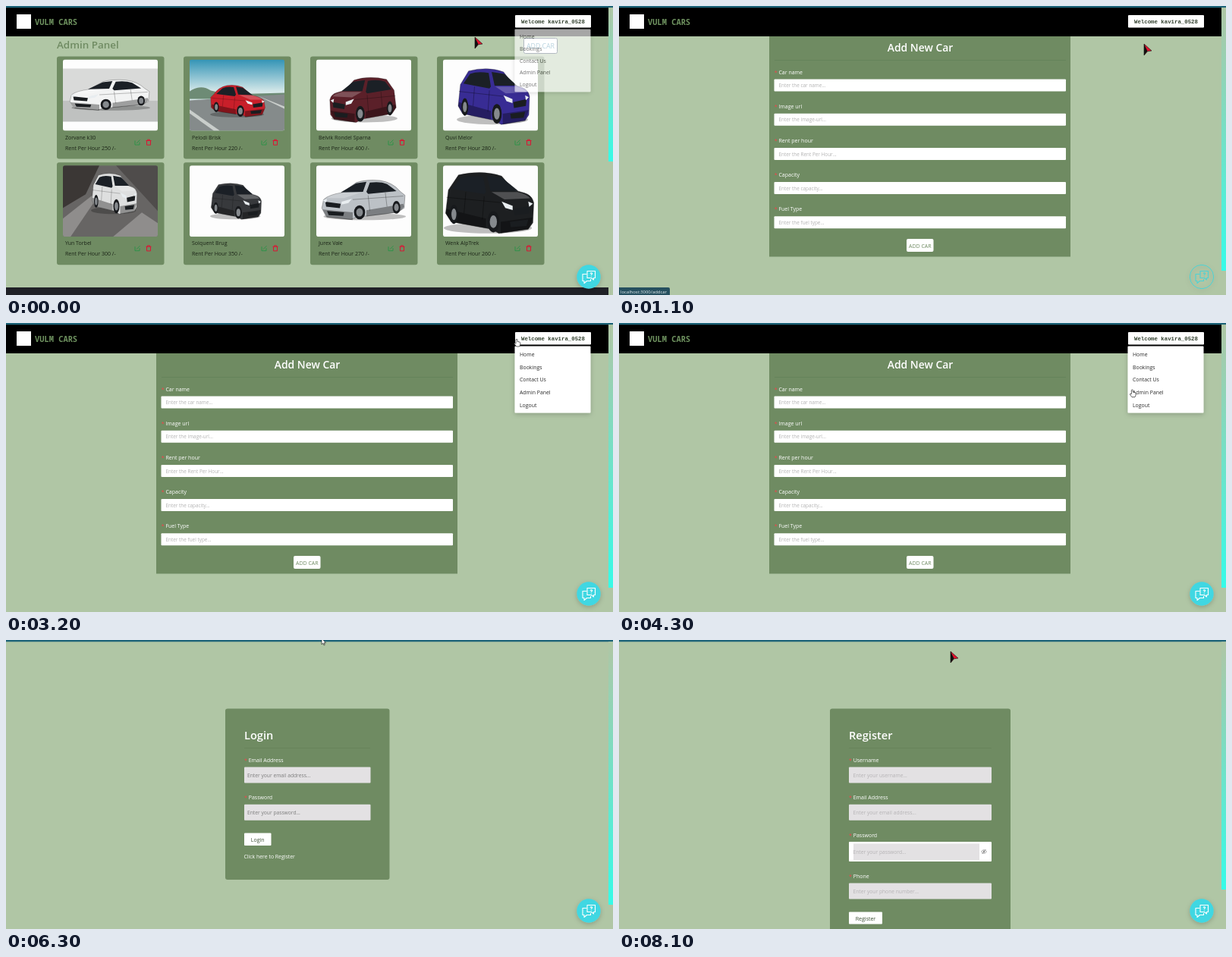
Animation, 800 px wide and 381 px high, one loop 8.2 s. Source, as an HTML page:

```html
<!DOCTYPE html>
<html lang="en">
<head>
<meta charset="utf-8">
<title>Car rental admin</title>
<style>
html, body { margin: 0; width: 100%; height: 100%; overflow: hidden; background: #b0c6a5; }
svg { display: block; width: 100vw; height: 100vh; }
text { font-family: "Open Sans", "Noto Sans", sans-serif; white-space: pre; }
</style>
</head>
<body>
<svg id="stage" viewBox="0 0 800 381" preserveAspectRatio="none"></svg>
<script>
const GREEN = '#6f8b62', BG = '#b0c6a5';
const rect = (x, y, w, h, fill, r = 0, more = '') =>
  `<rect x="${x}" y="${y}" width="${w}" height="${h}" rx="${r}" fill="${fill}" ${more}/>`;
const text = (x, y, s, size, fill, more = '') =>
  `<text x="${x}" y="${y}" font-size="${size}" fill="${fill}" ${more}>${s}</text>`;
const path = (d, fill, more = '') => `<path d="${d}" fill="${fill}" ${more}/>`;
const line = (d, color, w = 1) => path(d, 'none', `stroke="${color}" stroke-width="${w}"`);
const group = (id, body, more = '') => `<g id="${id}" ${more}>${body}</g>`;
const middle = 'text-anchor="middle"';

// Body, windows and bonnet of a car in a 100 x 60 box, nose to the left
const shapes = {
  low: ['M2 42 L4 30 Q10 23 26 20 L42 6 Q54 1 70 3 Q85 6 93 18 L99 24 L98 42 L90 48 L42 55 L36 58 L7 54Z',
        'M24 20 L42 7 L54 5 L50 19Z M54 19 L58 6 Q70 4 78 8 L89 18 L56 22Z',
        'M7 28 Q12 23 26 20 L48 20 L28 28Z'],
  tall: ['M3 49 L2 30 Q4 23 12 21 L24 18 L37 5 Q58 -1 84 4 L95 18 L98 40 L92 48 L48 55 L40 59 L8 55Z',
         'M19 19 L36 7 L53 5 L49 19Z M54 20 L57 6 Q72 4 82 7 L91 17 L56 22Z',
         'M6 26 Q9 22 20 20 L48 20 L34 27Z']
};
// A negative width turns the car round
function carBody(kind, color, x, y, w, h) {
  const [body, glass, bonnet] = shapes[kind];
  const wheel = (cx, cy, rx, ry) =>
    `<ellipse cx="${cx}" cy="${cy}" rx="${rx}" ry="${ry}" fill="#17191c"/>` +
    `<ellipse cx="${cx}" cy="${cy}" rx="${rx * .6}" ry="${ry * .6}" fill="#85898d"/>`;
  return `<g transform="translate(${x} ${y}) scale(${w / 100} ${h / 60})">` +
    '<ellipse cx="52" cy="54" rx="48" ry="5" fill="#000" opacity=".25"/>' +
    path(body, color, 'stroke="#2228" stroke-width=".6"') + path(glass, '#1b2026') +
    path('M3 44 L38 48 L38 59 L8 55Z M54 45 L97 36 L98 40 L92 48 L54 54Z', '#000', 'opacity=".35"') +
    path(bonnet, '#fff', 'opacity=".22"') +
    line('M38 30 L97 25 M56 24 L58 46 M76 20 L78 40', '#0006', .7) +
    path('M6 33 L24 36 L23 42 L7 40Z M8 46 L28 48 L27 53 L10 52Z', '#1a1d20') +
    path('M3 31 L8 29 L7 34Z M25 33 L37 29 L33 35 L25 37Z', '#e8edf0') +
    wheel(46, 48, 6.5, 10) + wheel(89, 41, 4.5, 9) + '</g>';
}

const backdrops = {
  plain: rect(0, 0, 125, 94, '#fdfdfd'),
  studio: rect(0, 0, 125, 94, '#fdfdfd') + rect(0, 12, 125, 42, '#d9dad9') + rect(0, 54, 125, 28, '#bfc1c0'),
  coast: rect(0, 0, 125, 94, 'url(#sky)') + path('M0 42 Q15 32 28 41 L50 46 L125 44 V52 H0Z', '#6d8b75') +
    path('M0 54 L125 46 V94 H0Z', '#858b8b') + path('M0 66 L40 94 H32 L0 71Z M90 48 L125 62 V65Z', '#c9cecb'),
  hall: rect(0, 0, 125, 94, '#676564') + path('M0 0 H48 L30 38 L0 56Z', '#3b3735') +
    path('M70 0 H125 V60Z', '#4f4c4b') + path('M0 70 L38 40 L44 44 L10 94 H0Z M66 94 L104 62 L125 76 V94Z', '#8f8d8c')
};

const cars = [
  ['Zorvane k30', 250, 'studio', 'low', '#f2f3f3', 7, 25, 108, 43],
  ['Pelodi Brisk', 220, 'coast', 'low', '#c81f2a', 101, 32, -74, 45],
  ['Belvik Rondel Sparna', 400, 'plain', 'tall', '#5b2029', 16, 22, 91, 62],
  ['Quvi Melor', 280, 'plain', 'tall', '#382c94', 116, 10, -98, 77],
  ['Yun Torbel', 300, 'hall', 'tall', '#dedfdf', 99, 9, -62, 56],
  ['Solquent Brug', 350, 'plain', 'tall', '#37393c', 96, 22, -69, 50],
  ['Jurex Vale', 270, 'plain', 'low', '#bcc1c6', 5, 17, 113, 56],
  ['Wenk AlpTrek', 260, 'plain', 'tall', '#1d1f21', 122, 7, -121, 84]
];

function card([name, rent, bg, ...car], i) {
  const ink = '#1b2417';
  return `<g transform="translate(${67 + i % 4 * 167} ${66.5 + (i >> 2) * 139.7})">` +
    rect(0, 0, 141.5, 135, GREEN, 3) +
    '<g transform="translate(8 4)" clip-path="url(#photo)">' + backdrops[bg] + carBody(...car) + '</g>' +
    text(11, 109, name, 7, ink) + text(11, 123, `Rent Per Hour ${rent} /-`, 7, ink) +
    line('M103 111 V116.5 H109 V113 M105 114.5 L109.5 110', '#269447', .9) +
    line('M117.5 111 H124.5 M119.5 111 V109.7 H122.5 V111 M118.5 111 V116.7 H123.5 V111', '#dc1434', 1) + '</g>';
}

function label(x, y, s) {
  return text(x, y + 2.5, '*', 7, '#f0444b') + text(x + 5.7, y + 2.5, s, 7, '#fff', 'font-weight="500"');
}

const admin = text(67, 56, 'Admin Panel', 13.4, GREEN, 'font-weight="600"') +
  rect(682.5, 42.5, 44, 20, '#fff', 2, 'stroke="#23374d"') +
  text(704.5, 56, 'ADD CAR', 8.75, '#3482a5', middle) +
  cars.map(card).join('') + rect(0, 371, 794, 10, '#202127');

const fields = [['Car name', 'car name'], ['Image url', 'image-url'], ['Rent per hour', 'Rent Per Hour'],
  ['Capacity', 'capacity'], ['Fuel Type', 'fuel type']];
const form = rect(198, 40, 397, 290.5, GREEN) +
  text(397, 60, 'Add New Car', 13.9, '#fff', middle + ' font-weight="600"') +
  rect(205, 71, 384, .7, '#62805a') +
  fields.map(([name, hint], i) => {
    const y = 87 + i * 45.2;
    return label(204.7, y, name) + rect(204.5, y + 9.5, 384.5, 16, '#fff', 1) +
      text(210.5, y + 20.2, `Enter the ${hint}...`, 6.4, '#b2b2b2');
  }).join('') +
  rect(379, 307, 35.5, 17, '#fff', 2) + text(396.8, 318.5, 'ADD CAR', 7, GREEN, middle);

const entry = (x, y, w, name, hint, color) => label(x, y, name) +
  rect(x, y + 9.5, w, 21, '#e3e1e3', 1) + text(x + (w > 170 ? 5.5 : 4), y + 22.5, hint, 6.7, color);
const heading = (x, s, w) => text(x, 131, s, 14.6, '#fff', 'font-weight="600"') + rect(x, 142, w, .7, '#658258');

const login = rect(289, 90.5, 216.5, 225.5, GREEN, 3) + heading(314, 'Login', 166) +
  entry(314, 158, 166.5, 'Email Address', 'Enter your email address...', '#7c7c7c') +
  entry(314, 207.3, 166.5, 'Password', 'Enter your password...', '#7c7c7c') +
  rect(314, 254.5, 35.5, 16.5, '#fff', 1) + text(331.7, 266, 'Login', 7, '#3d5135', middle) +
  text(313.5, 288, 'Click here to Register', 6.9, '#fff');

const pale = '#b5b3b5';
const register = rect(278, 90.5, 238, 300, GREEN, 3) + heading(303, 'Register', 188) +
  entry(303, 158, 188, 'Username', 'Enter your username...', pale) +
  entry(303, 207.3, 188, 'Email Address', 'Enter your email address...', pale) +
  label(303, 257, 'Password') + rect(303, 266, 188, 26, '#fff', 1) + rect(309, 268.5, 166, 21.5, '#e3e1e3') +
  text(308.5, 281.7, 'Enter your password...', 6.7, pale) +
  line('M477.5 279 Q481 274.5 484.5 279 Q481 283.5 477.5 279 M478.5 282 L483.5 276', '#888', .8) +
  '<circle cx="481" cy="279" r="1.2" fill="#888"/>' +
  entry(303, 311, 188, 'Phone', 'Enter your phone number...', pale) +
  rect(303, 358.5, 44, 16, '#fff', 1) + text(325, 369.5, 'Register', 7, '#3d5135', middle);

const header = rect(0, 2, 794, 38, '#000') + rect(14, 11, 19, 19, '#fff') +
  text(38, 24.5, 'VULM CARS', 10.4, '#6f9360', `style='font-family:"Noto Sans Mono",monospace' font-weight="700"`) +
  rect(671, 12, 100, 16.5, '#fff', 1) +
  text(679, 22.8, 'Welcome kavira_0528', 7.37, '#32402e',
    `style='font-family:"Liberation Mono","Courier New",monospace' font-weight="700"`);

const menu = rect(670.5, 30.5, 100, 88, '#fff', 1, 'filter="url(#shadow)"') +
  ['Home', 'Bookings', 'Contact Us', 'Admin Panel', 'Logout']
    .map((s, i) => text(677, 44.2 + i * 16.6, s, 6.9, '#2a2a2a')).join('');

const chat = '<circle id="bubble" cx="768" cy="357" r="15.7" fill="#41d7e2" filter="url(#shadow)"/>' +
  '<g id="chatIcon" fill="none" stroke="#fff" stroke-width="1.1" stroke-linejoin="round">' +
  '<path d="M765.5 353.5 H760 V362.5 H762 V365.5 L765.5 362.5 H770.5 V360"/>' +
  '<path d="M766 349.5 H776.5 V358.5 H774.5 V361 L771.5 358.5 H766Z"/>' +
  '<path d="M770 352.8 Q771.5 351 772.6 352.6 Q772.6 353.6 771.3 354.4 V355 M771.3 356 V356.8"/></g>';

const cursors = group('red', path('M0 0 L10 9 L4.5 9.8 L0 15Z', '#e3132f', 'stroke="#111" stroke-width=".6"') +
    path('M0 0 L4.5 9.5 L0 15Z', '#111')) +
  group('arrow', path('M0 0 V7.8 L1.8 6.2 L3.1 9 L4.2 8.4 L3 5.8 H5.5Z', '#fff', 'stroke="#222" stroke-width=".7"')) +
  group('hand', path('M0 .8 Q1 -.5 2 .8 V3.5 Q5.6 3.4 5.8 5.4 Q6 8 4.6 10 H.6 L-2 6.5 Q-2.2 5 0 6Z',
    '#fff', 'stroke="#222" stroke-width=".7"'));

const stage = document.getElementById('stage');
stage.innerHTML = `<defs>
  <clipPath id="photo"><rect width="125" height="94" rx="3"/></clipPath>
  <linearGradient id="sky" x2="0" y2="1"><stop stop-color="#3394b6"/><stop offset=".45" stop-color="#d5e8e9"/></linearGradient>
  <linearGradient id="thumbFill" x2="0" y2="1"><stop stop-color="${BG}"/><stop offset="1" stop-color="#36fbe8"/></linearGradient>
  <filter id="shadow" x="-20%" y="-20%" width="140%" height="150%"><feDropShadow dx="0" dy="2" stdDeviation="3" flood-opacity=".2"/></filter>
  </defs>` + rect(0, 0, 800, 381, BG) +
  group('admin', admin) + group('form', form) + group('login', login) + group('register', register) +
  group('header', header) + rect(0, 0, 800, 2.3, '#1d6378') +
  rect(794, 2.3, 6, 200, 'url(#thumbFill)', 0, 'id="thumb"') +
  group('menu', menu) + group('chat', chat) +
  group('status', path('M0 371 H65 Q67 371 67 373 V381 H0Z', '#26505f') +
    text(2, 378.7, '', 5.9, '#e6eef0', 'id="address"')) +
  group('cursor', cursors);

const $ = id => document.getElementById(id);
const show = (id, on) => $(id).style.display = on ? '' : 'none';
const clamp = v => Math.max(0, Math.min(1, v));

const pages = [[0, 'admin', 205], [1000, 'form', 349], [5400, 'login', 349], [7300, 'register', 329]];
// time, x, y, pointer from then on
const track = [[0, 618, 41, 'red'], [400, 686, 49, 'hand'], [600, 693, 50, 'hand'], [1000, 692, 50, 'red'],
  [1200, 692, 50, 'red'], [1700, 680, 26, 'hand'], [2200, 673, 21, 'hand'], [3400, 672, 21, 'hand'],
  [4600, 676, 100, 'hand'], [5000, 676, 110, 'hand'], [5200, 676, 112, 'arrow'], [5500, 675, 112, 'red'],
  [6200, 416, -2, 'arrow'], [6400, 416, -2, 'red'], [6900, 346, 282, 'hand'], [7300, 346, 282, 'red'],
  [8000, 437, 15, 'red'], [8200, 437, 15, 'red']];

function draw(t) {
  const [, page, end] = pages.findLast(p => p[0] <= t);
  pages.forEach(p => show(p[1], p[1] === page));
  show('header', t < 5400);
  $('thumb').setAttribute('height', end - 2.3);

  const open = t < 1000 ? clamp(.65 - t / 150) : clamp(Math.min((t - 1700) / 200, (5300 - t) / 200));
  show('menu', open > 0);
  $('menu').setAttribute('opacity', open);
  $('menu').setAttribute('transform', `translate(0 30.5) scale(1 ${.83 + .17 * open}) translate(0 -30.5)`);

  const hollow = t >= 1000 && t < 1300;
  $('bubble').setAttribute('fill', hollow ? 'none' : '#41d7e2');
  $('bubble').setAttribute('stroke', hollow ? '#4cd2d5' : 'none');
  $('chatIcon').setAttribute('stroke', hollow ? '#4cd2d5' : '#fff');

  show('status', t >= 400 && t < 1500 || t >= 6900 && t < 7700);
  $('address').textContent = 'localhost:3000/' + (t < 5000 ? 'addcar' : 'register');

  const i = track.findLastIndex(k => k[0] <= t), a = track[i], b = track[i + 1];
  const u = (t - a[0]) / (b[0] - a[0]), e = u * u * (3 - 2 * u);
  $('cursor').setAttribute('transform', `translate(${a[1] + (b[1] - a[1]) * e} ${a[2] + (b[2] - a[2]) * e})`);
  ['red', 'arrow', 'hand'].forEach(c => show(c, c === a[3]));
}

const start = performance.now();
function tick() {
  const t = (performance.now() - start) % 8200;
  draw(Math.floor(t / 100) * 100);
  requestAnimationFrame(tick);
}
tick();
</script>
</body>
</html>
```
